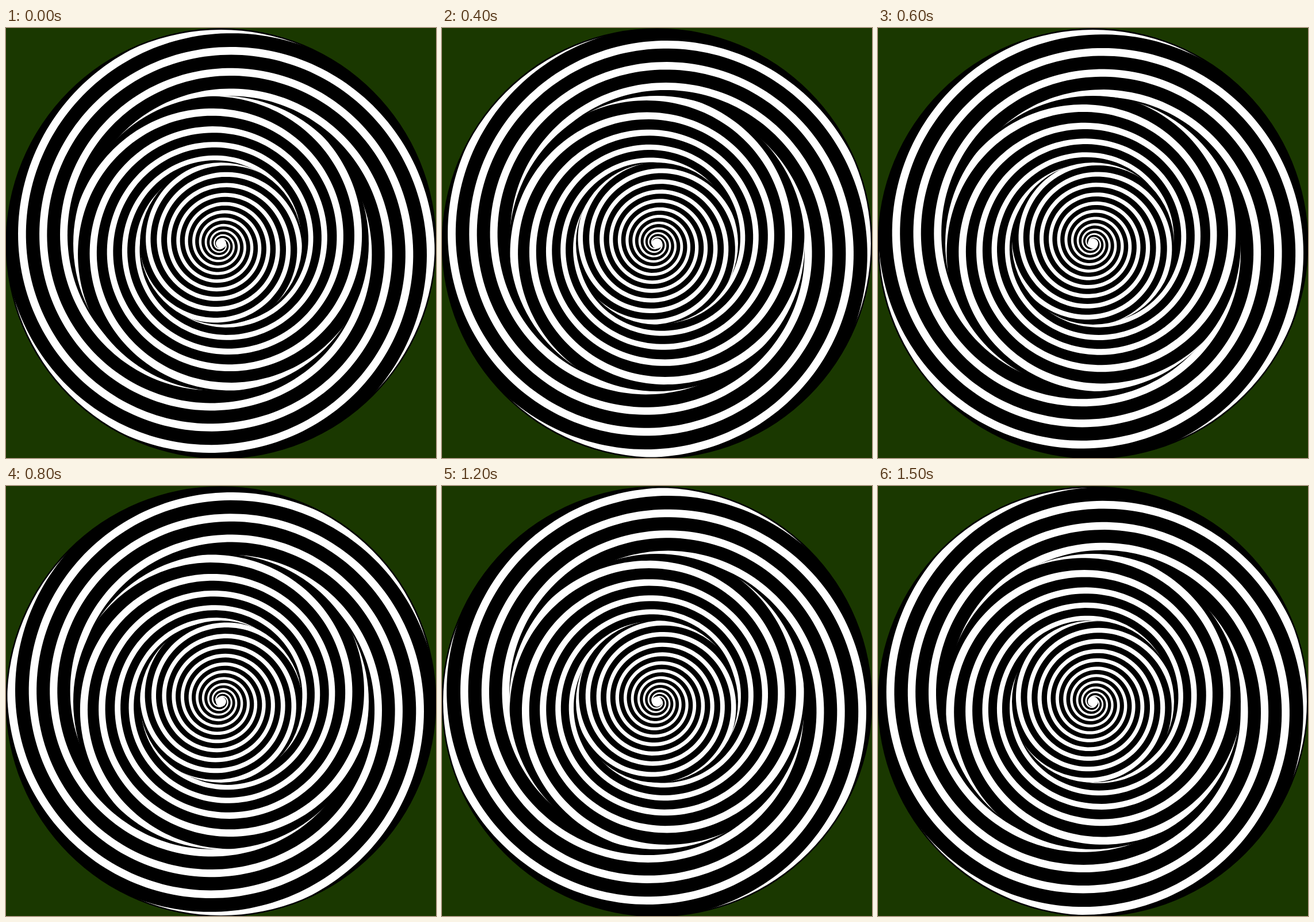
An HTML page with a canvas that plays this animation: 748x748 px, repeating every 1.6 s.

```html
<!DOCTYPE html>
<html lang="en">
<head>
<meta charset="utf-8">
<title>Spiral disc</title>
<style>
  html, body { margin: 0; height: 100%; overflow: hidden; background: #1a3800; }
  canvas { display: block; }
</style>
</head>
<body>
<canvas id="stage" width="748" height="748"></canvas>
<script>
const ctx = document.getElementById('stage').getContext('2d');
const STEP_MS = 100, STEPS = 16, ARMS = 3;
const RADIANS = Math.PI / 180;
const DROP = 1.6;    // the spirals sit slightly off the pivot
const MARGIN = 45;   // arms overshoot their ring so that only the clip trims them

// Each ring holds three arms; angle(r) is the arm's centre line in degrees clockwise from the top.
const rings = [
  { from: 0, to: 141, width: 51,
    angle: r => -3 + 137 * (Math.sqrt(r) - Math.sqrt(141)) },
  { from: 141, to: 257, width: 47,
    angle: r => 24.5 + 510 * Math.log(257 / r) / Math.log(257 / 141) },
  { from: 257, to: 372, width: 44,
    angle: r => 95.2 + 18.45 * (r ** 0.75 - 257 ** 0.75) }
];

function circle(path, radius) {
  path.moveTo(radius, 0);
  path.arc(0, 0, radius, 0, 2 * Math.PI);
}

function armsPath({ from, to, width, angle }) {
  const path = new Path2D();
  const start = Math.max(3, from - MARGIN), end = to + MARGIN;
  const point = (r, degrees) => {
    const a = degrees * RADIANS;
    path.lineTo(r * Math.sin(a), DROP - r * Math.cos(a));
  };
  for (let arm = 0; arm < ARMS; arm++) {
    const turn = arm * 360 / ARMS;
    for (let r = start; r <= end; r += 0.5) point(r, angle(r) + turn - width / 2);
    for (let r = end; r >= start; r -= 0.5) point(r, angle(r) + turn + width / 2);
    path.closePath();
  }
  return path;
}

function ringPath({ from, to }) {
  const path = new Path2D();
  circle(path, to);
  if (from) circle(path, from);
  return path;
}

for (const ring of rings) {
  ring.arms = armsPath(ring);
  ring.clip = ringPath(ring);
}

const disc = new Path2D(), hub = new Path2D();
circle(disc, 374.5);
circle(hub, 9);

function draw(step) {
  ctx.fillStyle = '#1a3800';
  ctx.fillRect(0, 0, 748, 748);
  ctx.save();
  ctx.translate(374, 375);
  ctx.rotate(step / STEPS * 2 * Math.PI);
  ctx.fillStyle = '#000';
  ctx.fill(disc);
  ctx.fillStyle = '#fff';
  for (const { arms, clip } of rings) {
    ctx.save();
    ctx.clip(clip, 'evenodd');
    ctx.fill(arms);
    ctx.restore();
  }
  ctx.fill(hub);
  ctx.restore();
}

const began = performance.now();
function tick() {
  draw(Math.floor((performance.now() - began) / STEP_MS) % STEPS);
  requestAnimationFrame(tick);
}
tick();
</script>
</body>
</html>
```
